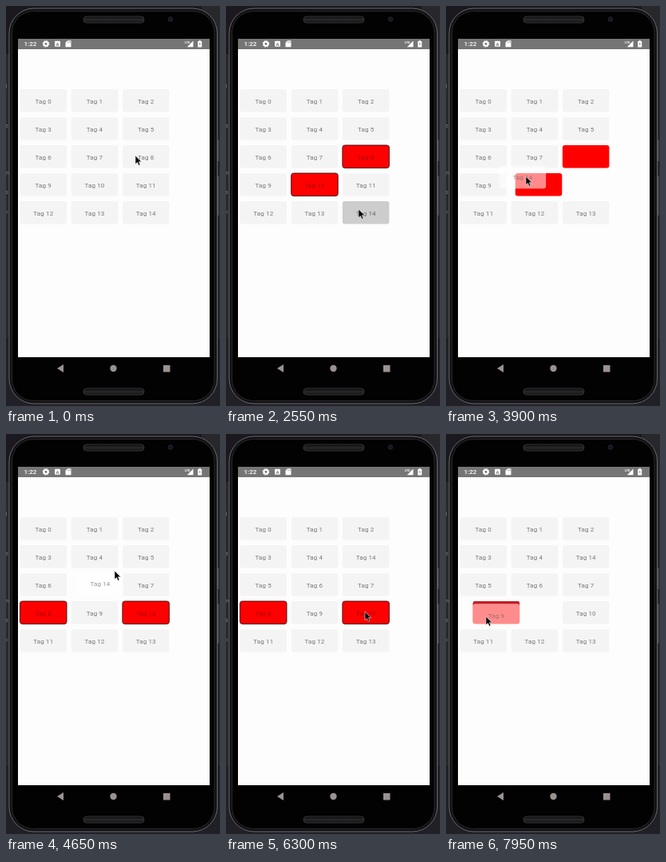
An HTML page that plays this animation: 268 px wide and 500 px high, repeating every 8000 ms.

```html
<!DOCTYPE html>
<html lang="en">
<head>
<meta charset="utf-8">
<title>Tag grid drag and drop</title>
<style>
  html, body { margin: 0; width: 100%; height: 100%; overflow: hidden; background: #232328; }
  svg { display: block; width: 268px; height: 500px; }
  text { font-family: Roboto, Arial, sans-serif; }
  .tag text { font-size: 8px; letter-spacing: .15px; text-anchor: middle; }
  .code { font: 7px "DejaVu Sans Mono", monospace; fill: #85858a; }
</style>
</head>
<body>
<svg viewBox="0 0 268 500">
  <defs>
    <linearGradient id="speaker" x2="0" y2="1">
      <stop offset="0" stop-color="#08080a"/>
      <stop offset=".5" stop-color="#29292c"/>
      <stop offset="1" stop-color="#101012"/>
    </linearGradient>
    <clipPath id="cell"><rect width="58.5" height="28.5" rx="3"/></clipPath>
  </defs>

  <!-- desktop behind the phone -->
  <rect width="268" height="500" fill="#27272c"/>
  <rect width="245" height="60" fill="#1b191f"/>
  <rect y="415" width="268" height="85" fill="#202026"/>
  <g class="code">
    <text x="-1" y="102">)</text>
    <text x="-1" y="152">e</text>
    <text x="-2" y="211">m</text>
    <text x="-1" y="235">s</text>
    <text x="-1" y="247">:</text>
    <text x="-1" y="260">=</text>
  </g>

  <!-- phone -->
  <rect x="264" y="167" width="3" height="27" rx="1" fill="#47474b"/>
  <rect x="264" y="212" width="3" height="50" rx="1" fill="#47474b"/>
  <rect x="4" y="3" width="260.5" height="494" rx="31" fill="#111113" stroke="#68686c"/>
  <rect x="7.5" y="6.5" width="253.5" height="487" rx="27" fill="#020203" stroke="#29292c"/>
  <rect x="97" y="13" width="76" height="8" rx="4" fill="url(#speaker)" stroke="#343437"/>
  <rect x="97" y="478" width="76" height="8" rx="4" fill="url(#speaker)" stroke="#343437"/>
  <circle cx="206" cy="16.5" r="2.8" fill="#16151f" stroke="#2a2935" stroke-width=".8"/>

  <!-- screen and status bar -->
  <rect x="15" y="41" width="240" height="398" fill="#fdfdfd"/>
  <rect x="15" y="41" width="240" height="13" fill="#757575"/>
  <g fill="#fff">
    <text x="22.5" y="50.3" font-size="8" font-weight="500">1:22</text>
    <circle cx="50" cy="47.3" r="2.5" fill="none" stroke="#fff" stroke-width="2"/>
    <circle cx="50" cy="47.3" r="3.7" fill="none" stroke="#fff" stroke-width="1.2" stroke-dasharray="1.5 1.4"/>
    <rect x="61" y="43.7" width="7" height="7" rx="1"/>
    <text x="62.4" y="49.6" font-size="6" font-weight="700" style="fill:#757575">A</text>
    <path d="M77 43.3h4.5v8h-7v-5.5z"/>
    <path d="M77.5 44.5v1.6M79 44.5v1.6M80.4 44.5v1.6" stroke="#757575" stroke-width=".6"/>
    <path d="M234.5 43.5v7.7h-7.7z"/>
    <text x="224" y="46.6" font-size="4" font-weight="700">LTE</text>
    <path d="M241.7 43h2v1h1.5v7.5h-5v-7.5h1.5z"/>
    <path d="M243.2 45l-1.5 2.7h1l-.3 2 1.4-2.7h-1z" fill="#757575"/>
  </g>

  <!-- navigation -->
  <g fill="#9b9191">
    <path d="M64 453l8-5v10z"/>
    <circle cx="134.5" cy="453" r="4.2"/>
    <rect x="197" y="449" width="8.5" height="8.5"/>
  </g>

  <g id="tags"></g>
  <path id="cursor" d="M0 0V10.6L2.5 8.4L4.2 12.2L6 11.4L4.4 7.7H7.6Z" fill="#050505" stroke="#e8e8e8" stroke-width=".6"/>
</svg>

<script>
const LOOP = 8000, STEP = 150, SLIDE = 275;
const layer = document.getElementById('tags');
const cursor = document.getElementById('cursor');

// time, x, y
const pointer = [
  [0, 162, 187], [150, 152, 191], [300, 136, 198], [450, 126, 203], [600, 148, 201],
  [750, 169, 198], [900, 169, 198], [1200, 165, 198], [1500, 120, 213], [1650, 124, 217],
  [1800, 124, 219], [2250, 166, 254], [2700, 166, 254], [2850, 164, 250], [3150, 153, 220],
  [3450, 149, 214], [3900, 100, 213], [4050, 99, 207], [4350, 116, 184], [4650, 136, 171],
  [4950, 168, 156], [5250, 172, 152], [5400, 172, 152], [6300, 174, 222], [6450, 174, 223],
  [7050, 108, 224], [7500, 108, 224], [7650, 104, 224], [7950, 50, 228]
];

// dragged tags: centre over time
const drags = [
  { tag: 14, from: 2850, to: 5250, path: [
    [2850, 175, 258], [3150, 169, 252], [3450, 160, 228], [3600, 145, 218], [3900, 96, 214],
    [4050, 94, 212], [4350, 103, 200], [4650, 118, 187], [4950, 156, 163], [5250, 175, 153]] },
  { tag: 9, from: 7650, to: LOOP, path: [[7650, 111, 223], [7950, 63, 226.5]] }
];

// time, tag, new slot
const moves = [[3450, 14, 11], [3850, 14, 10], [4180, 14, 7], [4930, 14, 5], [7858, 9, 9]];

const selected = { 8: [1200, LOOP], 10: [1800, 6600] };

// tag, start, end, x, y, radius, growth per ms
const ripples = [
  [8, 1050, 1200, 168, 197, 14, 0],
  [10, 1500, 1800, 117, 214, 8, .073],
  [14, 2550, 2850, 166, 258, 60, 0],
  [10, 6450, 6600, 174, 223, 16, 0],
  [9, 7350, 7650, 108, 224, 60, 0]
];

const within = (t, a, b) => t >= a && t < b;
const mix = (a, b, p) => a + (b - a) * p;
const ease = p => (1 - Math.cos(Math.PI * Math.min(1, p))) / 2;
const slotXY = i => [17.5 + i % 3 * 64.2, 104 + Math.floor(i / 3) * 35];

function along(path, t) {
  const i = path.findIndex(k => k[0] > t);
  if (i < 0) return path[path.length - 1].slice(1);
  if (!i) return path[0].slice(1);
  const a = path[i - 1], b = path[i], p = (t - a[0]) / (b[0] - a[0]);
  return [mix(a[1], b[1], p), mix(a[2], b[2], p)];
}

function add(parent, name, attrs) {
  const el = parent.appendChild(document.createElementNS('http://www.w3.org/2000/svg', name));
  set(el, attrs);
  return el;
}
function set(el, attrs) {
  for (const k in attrs) el.setAttribute(k, attrs[k]);
}
function place(el, [x, y]) {
  set(el, { transform: `translate(${x.toFixed(2)} ${y.toFixed(2)})` });
}
function show(el, on) {
  el.style.display = on ? '' : 'none';
}

function makeTag(n) {
  const g = add(layer, 'g', { class: 'tag' });
  const box = add(g, 'rect', { width: 58.5, height: 28.5, rx: 3 });
  const edge = add(g, 'rect', { width: 58.5, height: 4, fill: '#c41d23', 'clip-path': 'url(#cell)' });
  const label = add(g, 'text', { x: 29.3, y: 17.6 });
  label.textContent = 'Tag ' + n;
  const wave = add(add(g, 'g', { 'clip-path': 'url(#cell)' }), 'circle', { fill: '#000', 'fill-opacity': .16 });
  return { n, g, box, edge, label, wave };
}

const tags = Array.from({ length: 15 }, (_, n) => makeTag(n));
for (const d of drags) {
  d.ghost = makeTag(d.tag);
  set(d.ghost.box, { fill: '#fff', 'fill-opacity': .55 });
  set(d.ghost.label, { fill: '#755c64', 'fill-opacity': .68 });
  show(d.ghost.edge, false);
  show(d.ghost.wave, false);
}

// slot positions after every reorder up to t
function layout(t) {
  let order = tags.map(tag => tag.n);
  const pos = order.map(slotXY);
  for (const [start, tag, slot] of moves) {
    if (t < start) break;
    order = order.filter(n => n !== tag);
    order.splice(slot, 0, tag);
    const p = ease((t - start) / SLIDE);
    order.forEach((n, i) => {
      const [x, y] = slotXY(i);
      pos[n] = [mix(pos[n][0], x, p), mix(pos[n][1], y, p)];
    });
  }
  return pos;
}

function render(t) {
  const pos = layout(t);
  const flat = within(t, 3450, 4200) || t >= 7858;
  for (const { n, g, box, edge, label, wave } of tags) {
    const red = !!selected[n] && within(t, ...selected[n]);
    const [x, y] = pos[n];
    place(g, pos[n]);
    show(g, !drags.some(d => d.tag === n && within(t, d.from, d.to)));
    set(box, {
      fill: red ? '#f00' : '#f4f4f4',
      stroke: red && !flat ? '#3a0808' : 'none',
      'stroke-width': .9
    });
    show(edge, red && t >= 7858);
    set(label, { fill: red ? '#a80000' : '#777' });
    show(label, !red || !flat && t >= 1950);
    const r = ripples.find(r => r[0] === n && within(t, r[1], r[2]));
    show(wave, r);
    if (r) set(wave, { cx: r[3] - x, cy: r[4] - y, r: r[5] + (t - r[1]) * r[6] });
  }
  for (const d of drags) {
    const on = within(t, d.from, d.to);
    show(d.ghost.g, on);
    if (on) {
      const [x, y] = along(d.path, t);
      place(d.ghost.g, [x - 29.3, y - 14.3]);
    }
  }
  place(cursor, along(pointer, t));
}

const begin = performance.now();
function tick() {
  const t = (performance.now() - begin) % LOOP;
  render(Math.floor(t / STEP) * STEP);
  requestAnimationFrame(tick);
}
tick();
</script>
</body>
</html>
```
